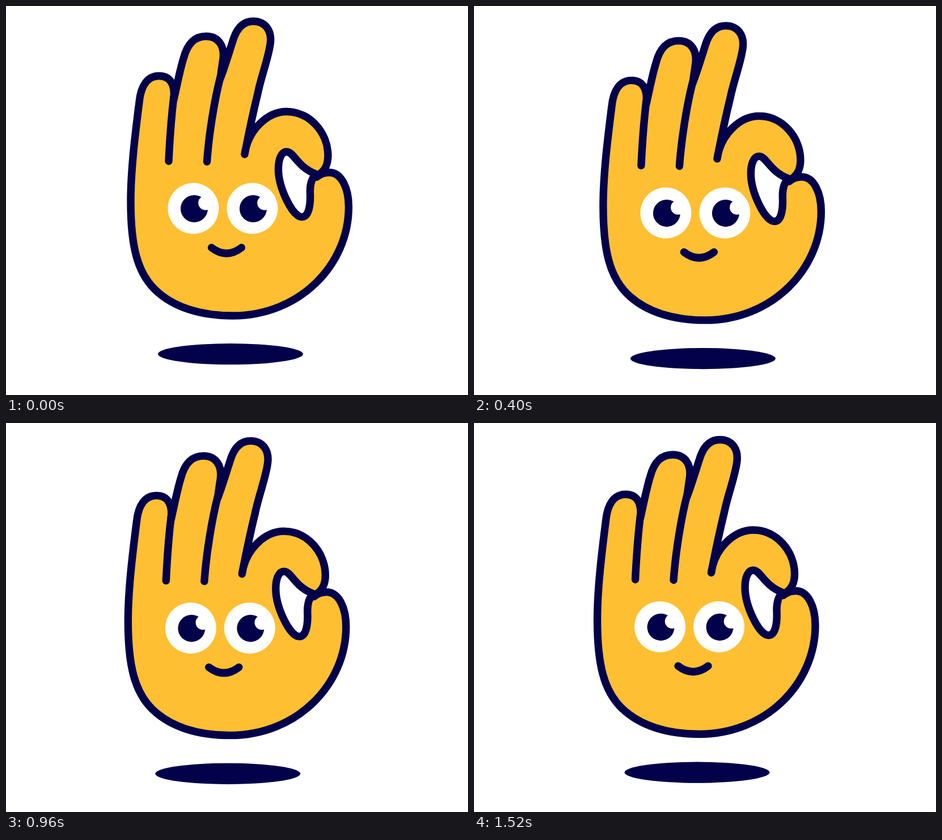
Write an HTML page without scripts that moves like this. It is 815 px wide and 687 px high and loops after 1.6 s.

```html
<!DOCTYPE html>
<html lang="en">
<head>
<meta charset="utf-8">
<title>Floating OK hand</title>
<style>
  @property --phase { syntax: "<angle>"; inherits: false; initial-value: 0deg; }
  @keyframes sway { to { --phase: 360deg; } }

  html, body { margin: 0; width: 100%; height: 100%; overflow: hidden; background: #fff; }
  svg { display: block; width: 100vw; height: 100vh; }
  .line { fill: none; stroke: #02014a; stroke-width: 13.4; stroke-linecap: round; stroke-linejoin: round; }
  .skin { fill: #ffbf32; }
  .white { fill: #fff; }
  .ink { fill: #02014a; }

  /* Sine sway along a V, dipping on both sides, in 80 ms poses */
  .float {
    --x: calc(7.9px * sin(var(--phase)));
    transform: translate(var(--x), max(var(--x), -1 * var(--x)));
    animation: sway 1.6s steps(20) infinite;
  }
</style>
</head>
<body>
<svg viewBox="0 0 815 687">
  <defs>
    <g id="eye">
      <circle class="white" r="45"/>
      <circle class="ink" cx="1.5" cy=".5" r="24"/>
      <circle class="white" cx="21.5" cy="-9.7" r="12.8"/>
    </g>
  </defs>
  <g class="float">
    <ellipse class="ink" cx="396" cy="614.7" rx="128" ry="18.6"/>

    <!-- Palm and fingers -->
    <path class="line skin" d="M220 345
      C220 290 228 225 235 170 C238 140 250 123.5 270 123.5
      C287 123.5 299 135 296 165 C301 143 307 112 313 93
      C320 66 333 53.5 353 53.5 C374 53.5 388 70 382 100 L378 128
      C386 108 394 80 402 56 C409 37 420 27 436 27
      C457 27 470 43 466 68 C462 95 450 125 444 155 Q433 200 421 262
      C427 218 462 186.5 495 186.5 C537 186.5 568 225 568 264
      C568 279 564 289 553 297 L548 302 C554 297 562 294 570 294
      C592 294 604.5 322 604.5 355 C604.5 457 518 547 400 547
      C345 547 295 533 262 500 C232 470 220 425 220 345Z"/>
    <path class="line" d="M296 160 Q290 210 287 274 M378 126 C368 165 358 225 354.5 275"/>

    <!-- Gap between index finger and thumb -->
    <path class="line white" style="fill: #fff" d="M495 257.5
      C508 257.5 514 285 547 297 C540 303 536 314 536.5 330
      C537.5 352 534 372.5 522 372.5 C505 372.5 480.5 320 480.5 288
      C480.5 270 486 257.5 495 257.5Z"/>

    <use href="#eye" x="330.5" y="357.5"/>
    <use href="#eye" x="434.5" y="357.5"/>
    <path class="line" d="M362.5 426.7 Q389 447 415.5 426.7"/>
  </g>
</svg>
</body>
</html>
```
